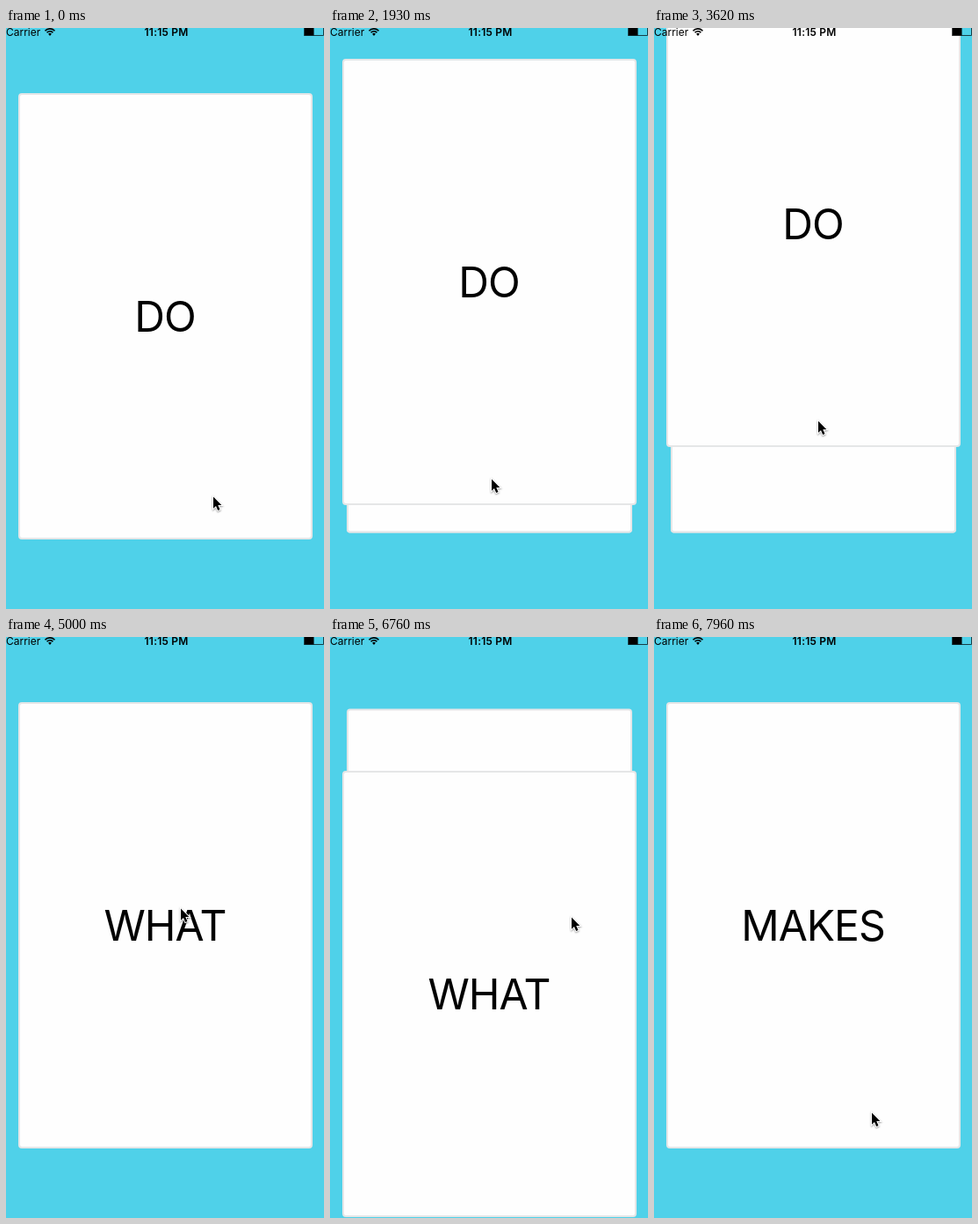
Recreate the animation shown at these times as an HTML page with a canvas. Size 362x660 px, loop 7.99 s.

```html
<!DOCTYPE html>
<html lang="en">
<head>
<meta charset="utf-8">
<title>Card stack</title>
<style>
  html, body { margin: 0; width: 100%; height: 100%; overflow: hidden; background: #4fd1e9; }
  canvas { display: block; }
</style>
</head>
<body>
<canvas width="362" height="660"></canvas>
<script>
const ctx = document.querySelector('canvas').getContext('2d');
const LOOP = 7990;
const FONT = 'Inter, "Liberation Sans", sans-serif';
const CARD = { cx: 181.5, cy: 327.5, w: 335, h: 507 };
const BACK_SCALE = 0.97;
const FLING_SPEED = 1.6; // px per ms

// The pointer eases from stop to stop and carries the grabbed card along.
const home = { x: 236, y: 532 };
const strokes = [
  { from: 480, to: 900, x: 181, y: 557 },
  { from: 1380, to: 2170, x: 185, y: 500 },
  { from: 2400, to: 3080, x: 186, y: 588 },
  { from: 3080, to: 4140, x: 188, y: 313 },
  { from: 4300, to: 4700, x: 199, y: 313 },
  { from: 4960, to: 5150, x: 199, y: 271 },
  { from: 5360, to: 5720, x: 272, y: 222 },
  { from: 5760, to: 6400, x: 275, y: 290 },
  { from: 6600, to: 7365, x: 278, y: 532 },
  { from: 7850, to: 7960, x: 248, y: 540 }
];

const cards = [
  { word: 'DO', grab: 1535, release: 4160, anchor: 551, follow: 1 },
  { word: 'WHAT', grab: 5820, release: 7250, anchor: 223.5, follow: 0.825 },
  { word: 'MAKES', grab: Infinity, release: Infinity }
];

const mix = (a, b, u) => a + (b - a) * u;

function ease(t, from, to) {
  const u = Math.min(1, Math.max(0, (t - from) / (to - from)));
  return u * u * (3 - 2 * u);
}

function pointerAt(t) {
  return strokes.reduce((p, s) => {
    const u = ease(t, s.from, s.to);
    return { x: mix(p.x, s.x, u), y: mix(p.y, s.y, u) };
  }, home);
}

function cardOffset({ grab, release, anchor, follow }, t) {
  if (t < grab) return 0;
  const dragged = (pointerAt(Math.min(t, release)).y - anchor) * follow;
  const flung = Math.max(0, t - release) * FLING_SPEED;
  return dragged + Math.sign(dragged) * flung;
}

// A waiting card is slightly shrunken, then springs to full size.
function springScale(t, start) {
  const s = Math.max(0, t - start) / 1000;
  return 1 - (1 - BACK_SCALE) * Math.exp(-9 * s) * Math.cos(14 * s);
}

function drawText(text, x, y, font, align, spacing = 0) {
  ctx.fillStyle = '#000';
  ctx.font = `${font} ${FONT}`;
  ctx.textAlign = align;
  ctx.letterSpacing = `${spacing}px`;
  ctx.fillText(text, x, y);
}

function drawCard(word, offset, scale) {
  const { cx, cy, w, h } = CARD;
  ctx.save();
  ctx.translate(cx, cy + Math.round(offset));
  ctx.scale(scale, scale);
  ctx.beginPath();
  ctx.roundRect(-w / 2 + 1, -h / 2 + 1, w - 2, h - 2, 3);
  ctx.fillStyle = '#fefefe';
  ctx.fill();
  ctx.strokeStyle = '#e5e6e7';
  ctx.lineWidth = 2;
  ctx.stroke();
  drawText(word, -0.5, 17.5, '400 48px', 'center', -1);
  ctx.restore();
}

function drawStatusBar() {
  drawText('Carrier', 0, 9, '400 12px', 'left');
  drawText('11:15 PM', 182.5, 9, '600 12px', 'center', 0.2);

  ctx.strokeStyle = '#000';
  ctx.lineWidth = 1.6;
  const wifiArc = r => ctx.arc(50, 8.5, r, -Math.PI * 0.76, -Math.PI * 0.24);
  for (const r of [4.7, 7.6]) {
    ctx.beginPath();
    wifiArc(r);
    ctx.stroke();
  }
  ctx.beginPath();
  ctx.moveTo(50, 9);
  wifiArc(2.6);
  ctx.fill();

  ctx.lineWidth = 0.7;
  ctx.strokeRect(339.5, -0.5, 22, 9);
  ctx.fillRect(340, 0, 10.5, 8.5);
}

const arrow = new Path2D('M0 0V13.2L3 10.4L5.2 15.4L7.5 14.4L5.3 9.5H9.4Z');

function drawPointer({ x, y }) {
  ctx.save();
  ctx.translate(Math.round(x), Math.round(y) + 0.5);
  ctx.shadowColor = 'rgba(0,0,0,.4)';
  ctx.shadowBlur = 2;
  ctx.shadowOffsetY = 1;
  ctx.strokeStyle = '#fff';
  ctx.lineWidth = 2;
  ctx.stroke(arrow);
  ctx.shadowColor = 'transparent';
  ctx.fillStyle = '#000';
  ctx.fill(arrow);
  ctx.restore();
}

function render(t) {
  ctx.fillStyle = '#4fd1e9';
  ctx.fillRect(0, 0, 362, 660);
  for (let i = cards.length - 1; i >= 0; i--) {
    const scale = i ? springScale(t, cards[i - 1].release) : 1;
    drawCard(cards[i].word, cardOffset(cards[i], t), scale);
  }
  drawStatusBar();
  drawPointer(pointerAt(t));
}

const start = performance.now();
function tick() {
  render((performance.now() - start) % LOOP);
  requestAnimationFrame(tick);
}
tick();
</script>
</body>
</html>
```
